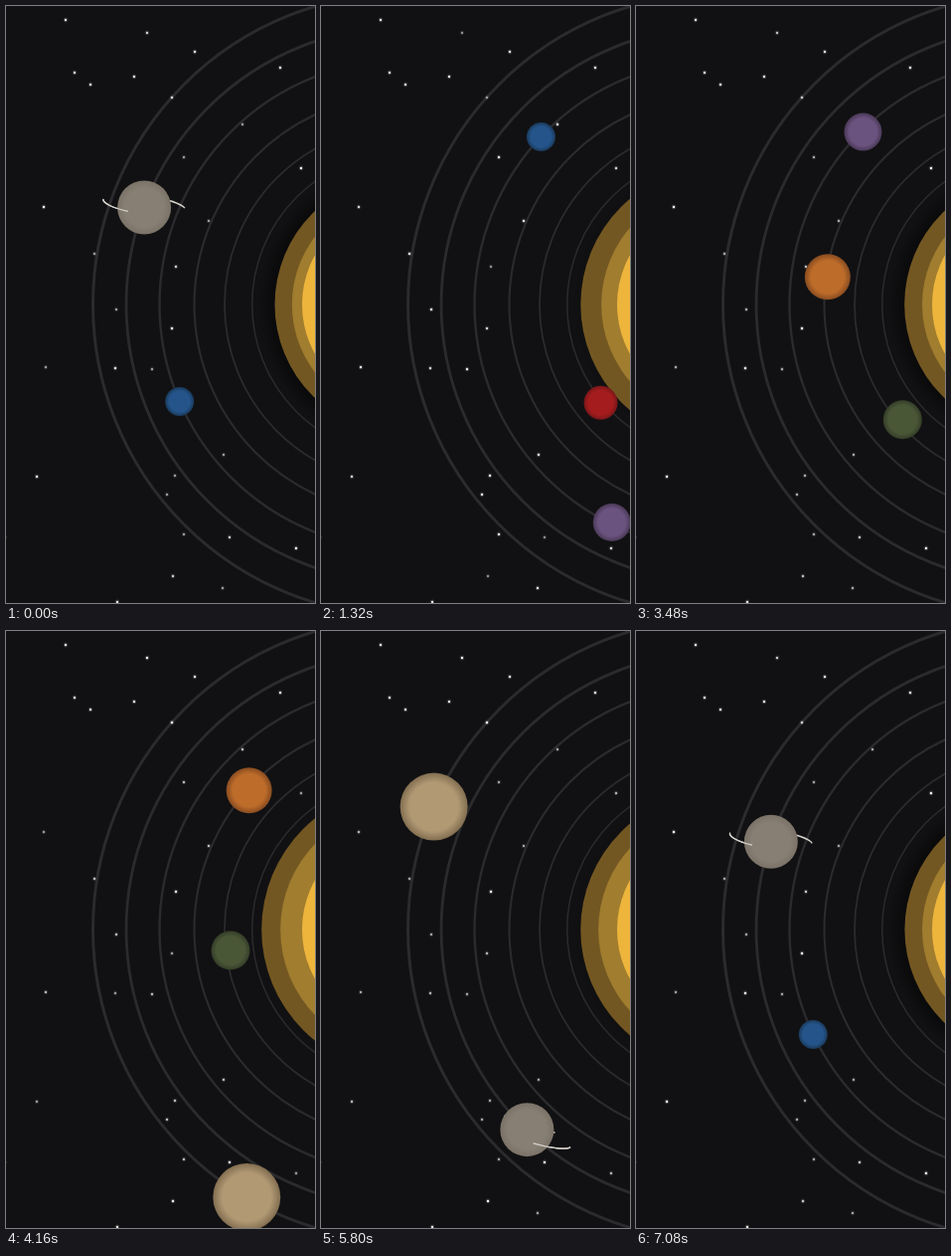
Recreate the animation shown at these times as an HTML page with a canvas. Size 311 by 600 pixels, loop 7120 ms.

```html
<!DOCTYPE html>
<html lang="en">
<head>
<meta charset="utf-8">
<title>Orbits</title>
<style>
html, body { margin: 0; width: 100%; height: 100%; overflow: hidden; background: #111113; }
canvas { display: block; width: 311px; height: 600px; }
</style>
</head>
<body>
<canvas id="stage" width="311" height="600"></canvas>
<script>
const ctx = document.getElementById('stage').getContext('2d');
const LOOP = 7120, PULSE = LOOP / 4, TAU = Math.PI * 2, RAD = Math.PI / 180;
const CX = 400, CY = 300;

// orbit radius, line width
const orbits = [[312.5, 3], [279, 2.8], [245.5, 2.4], [210.5, 2.1], [180, 1.8], [152.3, 1.5]];

// orbit radius, start angle, size, middle colour, edge colour
const planets = [
  [245.5, -23.45, 14.5, '#24548a', '#1a3959'],
  [154.2, -106.6, 17, '#a41c1e', '#7a1618'],
  [243.9, -130.7, 19, '#6b5380', '#4a3957'],
  [209, -168.4, 23, '#bd6c2a', '#874b20'],
  [175.3, -217.3, 19.5, '#4a5737', '#343e28'],
  [311.8, -270, 34, '#b19974', '#826e50'],
  [278.5, 20.45, 27, '#887f74', '#7b7267', true]
];

// peak time of the twinkle, then x, y pairs; null shines steadily
const stars = [
  [null, 60, 14, 190, 46, 69, 67, 85, 79, 129, 71, 276, 62, 112, 599],
  [400, 142, 27, 167, 92, 171, 262, 225, 534, 168, 573],
  [1700, 297, 163, 38, 202, 167, 324, 110, 364, 31, 473, 292, 545],
  [1100, 238, 119, 179, 152, 204, 216, 89, 249, 111, 305, 40, 363, 147, 365,
    219, 451, 170, 472, 162, 491, 179, 531, 218, 585]
];

// 0 at the start of a pulse, 1 halfway through
const wave = t => (1 - Math.cos(TAU * t / PULSE)) / 2;

function disc(x, y, r, fill) {
  ctx.fillStyle = fill;
  ctx.beginPath();
  ctx.arc(x, y, r, 0, TAU);
  ctx.fill();
}

function drawStars(t) {
  for (const [peak, ...xy] of stars) {
    const light = peak === null ? 0.92 : 0.5 + 0.5 * wave(t - peak + PULSE / 2);
    for (let i = 0; i < xy.length; i += 2) {
      disc(xy[i], xy[i + 1], 2.4, `rgba(255,255,255,${light * 0.14})`);
      disc(xy[i], xy[i + 1], 1.2, `rgba(255,255,255,${light})`);
    }
  }
  disc(-0.5, 534, 1.2, '#444');
}

function drawSun(t) {
  const swell = wave(t);
  const halo = ctx.createRadialGradient(CX, CY, 125, CX, CY, 147);
  halo.addColorStop(0, `rgba(0,0,0,${0.55 * (1 - swell)})`);
  halo.addColorStop(1, 'rgba(0,0,0,0)');
  disc(CX, CY, 147, halo);
  disc(CX, CY, 129.5 + 17.5 * swell, '#735722');
  disc(CX, CY, 112 + 14 * wave(t + 60), '#a07d2f');
  disc(CX, CY, 102, '#edb53c');
}

function drawRing(x, y, angle, front) {
  const turn = 20.4 - angle;
  const first = 112 + 1.86 * turn, second = -13 + 1.39 * turn;
  ctx.save();
  ctx.translate(x, y);
  ctx.rotate((11 - 0.15 * angle) * RAD);
  ctx.translate(0, -1.1 - 0.068 * angle);
  if (front) {
    ctx.beginPath();
    ctx.rect(-60, 0, 120, 30);
    ctx.clip();
  }
  ctx.strokeStyle = '#d6d2cc';
  ctx.lineWidth = 1.3;
  for (const from of [first, second - 72]) {
    ctx.beginPath();
    ctx.ellipse(0, 0, 43.7 - 0.08 * angle, 9.4, 0, from * RAD, (from + 70) * RAD);
    ctx.stroke();
  }
  ctx.restore();
}

function drawPlanet([orbit, start, size, mid, edge, ringed], t) {
  let angle = start + 360 * t / LOOP;
  angle -= 360 * Math.round(angle / 360);
  const x = CX - orbit * Math.cos(angle * RAD);
  const y = CY - orbit * Math.sin(angle * RAD);
  if (x - size > 340) return;
  if (ringed) drawRing(x, y, angle, false);
  const shade = ctx.createRadialGradient(x, y, size * 0.3, x, y, size);
  shade.addColorStop(0, mid);
  shade.addColorStop(0.6, mid);
  shade.addColorStop(1, edge);
  disc(x, y, size, shade);
  if (ringed) drawRing(x, y, angle, true);
}

function draw(now) {
  const t = now % LOOP;
  ctx.fillStyle = '#111113';
  ctx.fillRect(0, 0, 311, 600);
  ctx.strokeStyle = '#2b2b2d';
  for (const [r, width] of orbits) {
    ctx.lineWidth = width;
    ctx.beginPath();
    ctx.arc(CX, CY, r, 0, TAU);
    ctx.stroke();
  }
  drawStars(t);
  drawSun(t);
  planets.forEach(p => drawPlanet(p, t));
}

const begin = performance.now();
function tick() {
  draw(performance.now() - begin);
  requestAnimationFrame(tick);
}
tick();
</script>
</body>
</html>
```
